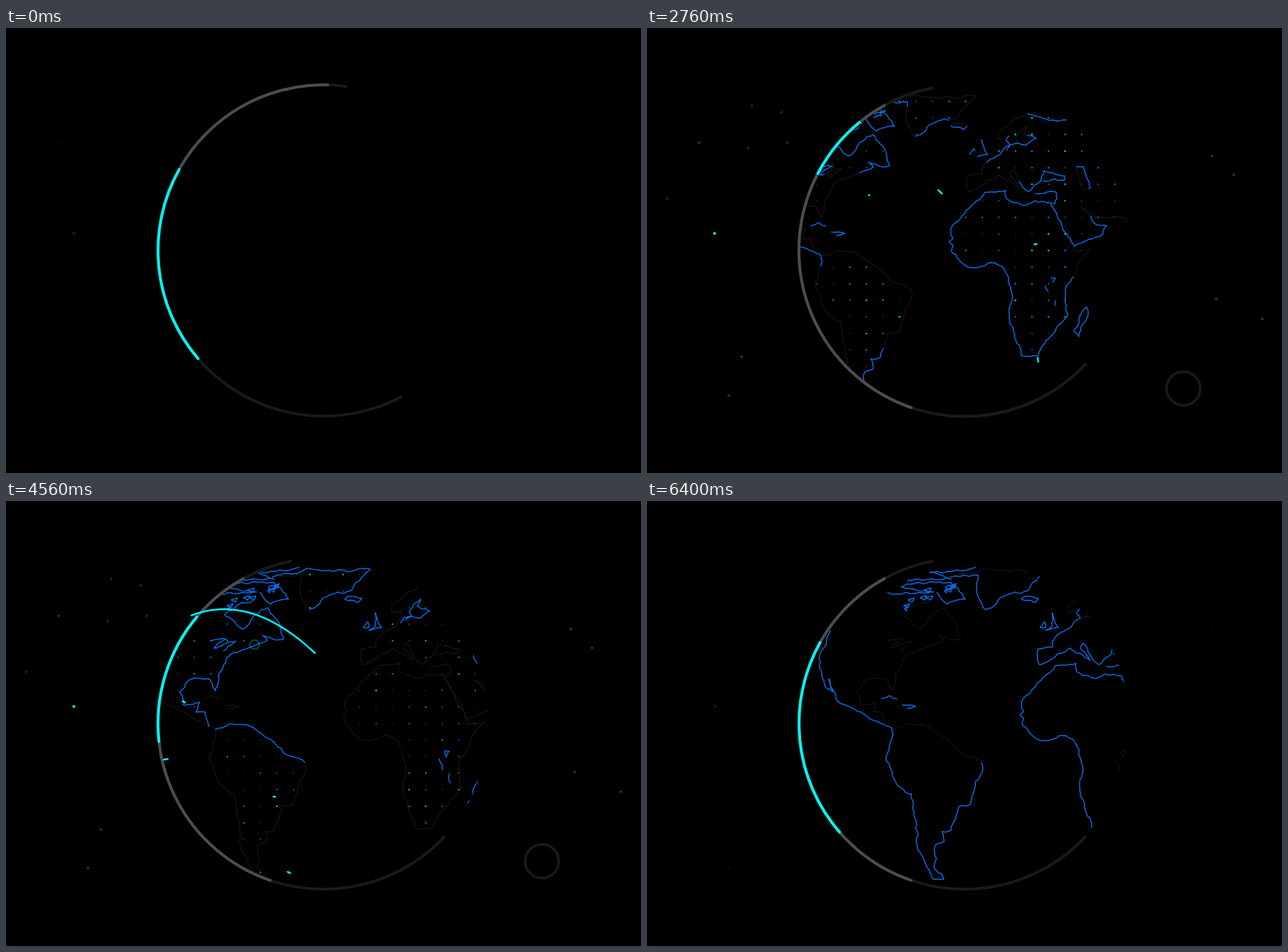
An HTML page with a canvas that plays this animation: 894 by 626 pixels, repeating every 6.44 s.

```html
<!DOCTYPE html>
<html lang="en">
<head>
<meta charset="utf-8">
<title>Globe</title>
<style>
html, body { margin: 0; height: 100%; overflow: hidden; background: #000; }
canvas { display: block; }
</style>
</head>
<body>
<canvas id="stage" width="894" height="626"></canvas>
<script>
const ctx = document.getElementById('stage').getContext('2d');
const LOOP = 6440, CX = 447, CY = 313, R = 233, TAU = Math.PI * 2;
const PIVOT_X = 301.5, PIVOT_Y = 267.7;
const CYAN = '#00f4f2', BLUE = '#0873f8', GREY = '#4d4d51', DARK = '#1a1a1a';
const NAVY = '#1d2f55', DIM = '#222226';
const KEYS = [1200, 2040, 3440, 4560, 5200, 6400];

let seed = 7;
const rand = () => (seed = seed * 16807 % 2147483647) / 2147483647;
const clamp = v => Math.max(0, Math.min(1, v));
const mix = (a, b, u) => a + (b - a) * u;
const rad = a => a * Math.PI / 180;
const parse = s => s.split(' ').map(p => p.split(',').map(Number));

// Each coast: state at every key time (0 dim, 1 lit, x hidden) and its corner points.
const COAST = {
  pacific: ['001001', '177,182 161,220 171,263 181,268 175,250 191,285 229,303 264,321 256,366 274,402 291,412 300,490 321,531 337,532'],
  naEast: ['010110', '254,318 250,297 237,297 242,283 219,287 214,268 226,253 255,250 264,267 269,243 290,213 337,196 330,189 360,194 349,165 337,150 320,160 302,180 277,160 302,143 317,140'],
  saEast: ['001001', '337,532 324,518 324,486 337,479 334,465 347,463 358,430 374,427 381,395 391,381 390,368'],
  saNorth: ['000110', '390,368 364,357 331,329 317,318 285,313 264,321'],
  afWest: ['011001', '493,232 468,256 446,283 449,295 444,300 449,305 447,314 470,336 508,330 520,337 533,378 528,400 545,460'],
  afEast: ['00100x', '545,460 568,461 595,420 611,403 607,367 643,311 620,314 603,277 586,248'],
  afNorth: ['011001', '565,232 594,231 592,247 564,243 552,249 525,241 523,228 493,232'],
  arabia: ['001001', '586,248 620,307 660,290 665,278 645,272 628,252 650,266 692,268 716,321'],
  euWest: ['010011', '471,230 470,208 489,206 493,192 529,165 524,158 528,152'],
  euSouth: ['010011', '471,230 497,215 515,207 543,224 529,206 533,200 555,230 572,216 577,201 606,208 606,214 575,215'],
  norway: ['010010', '527,156 512,157 512,148 534,128 552,121 594,131 625,128'],
  baltic: ['001100', '524,172 530,164 551,165 566,155 548,148 553,138 537,155 540,162 532,168'],
  britain: ['001101', '489,157 498,178 480,182 489,176 489,157'],
  ireland: ['001101', '472,178 479,170 480,178 472,178'],
  iceland: ['010111', '446,138 453,134 470,137 465,143 446,138'],
  glWest: ['001001', '344,107 385,104 383,130 396,153'],
  glEast: ['001101', '396,153 420,135 455,126 467,112 482,96'],
  glNorth: ['000110', '482,96 398,95 344,107'],
  baffin: ['011111', '257,128 322,128 277,121 347,115 367,138 342,145 327,128'],
  arctic: ['001111', '285,112 347,110 317,100 382,93'],
  cuba: ['011011', '249,278 260,274 271,279'],
  haiti: ['011011', '278,287 297,289 285,292'],
  greatLakes: ['001100', '257,196 280,194 262,207 293,197 275,211'],
  victoria: ['001100', '587,351 593,352 589,360 587,351'],
  tanganyika: ['001100', '579,362 584,379'],
  malawi: ['00110x', '593,383 595,397'],
  madagascar: ['01110x', '637,392 639,403 626,434 619,425 637,392'],
  caspian: ['001100', '622,195 633,195 642,225 632,228 622,195']
};

// Midpoint displacement turns a few corners into a natural shoreline.
function roughen([ax, ay], [bx, by], out) {
  const dx = bx - ax, dy = by - ay, d = Math.hypot(dx, dy);
  if (d > 3.5) {
    const k = Math.min(.13, 2.4 / d) * (rand() * 2 - 1);
    const mid = [(ax + bx) / 2 - dy * k, (ay + by) / 2 + dx * k];
    roughen([ax, ay], mid, out);
    roughen(mid, [bx, by], out);
  } else out.push([bx, by]);
}
function shoreline(state, corners) {
  const pts = [corners[0]], path = new Path2D();
  for (let i = 1; i < corners.length; i++) roughen(corners[i - 1], corners[i], pts);
  let len = 0;
  pts.forEach(([x, y], i) => {
    path.lineTo(x, y);
    if (i) len += Math.hypot(x - pts[i - 1][0], y - pts[i - 1][1]);
  });
  return { state, path, len };
}
const shores = Object.values(COAST).map(([state, text]) => shoreline(state, parse(text)));

// Scattered arctic islets.
for (let i = 0; i < 12; i++) {
  const x = mix(280, 350, rand()), y = mix(136, 104, (x - 280) / 70) + rand() * 18, w = 4 + rand() * 7;
  shores.push(shoreline('001101', [[x, y], [x + w, y - 3], [x + w * .7, y + 3], [x, y]]));
}

// Grid of dots over the land.
const land = new Path2D();
function addLand(pts) {
  pts.forEach(([x, y], i) => i ? land.lineTo(x, y) : land.moveTo(x, y));
  land.closePath();
}
for (const names of ['pacific saEast saNorth naEast', 'afWest afEast afNorth', 'glWest glEast glNorth', 'madagascar'])
  addLand(names.split(' ').flatMap(n => parse(COAST[n][1])));
addLand(parse('471,228 489,206 512,157 534,128 640,120 720,150 720,320 640,264 665,280 620,308 594,231 565,232 515,207'));
const dots = [];
for (let i = -13; i <= 12; i++) for (let j = -9; j <= 9; j++) {
  const x = 443.8 + 23.28 * i, y = CY + 23.28 * j;
  if (ctx.isPointInPath(land, x, y))
    dots.push({ x, y, color: rand() < .38 ? '#00d98c' : '#0b72dc', phase: rand() * TAU });
}

const STARS = {
  [NAVY]: parse('74,161.5 795,180 825,206.5 800.5,381 865.5,409 133.5,462 115.5,516.5'),
  [DIM]: parse('28.5,240 143,169 189.5,119 148,109.5 198,161.5'),
  [CYAN]: [[95.5, 289]]
};

// Flights peak at a time and follow a quadratic curve; small sparks are random.
const flight = (peak, text, life = 400) => ({ peak, life, pts: parse(text) });
const flights = [
  flight(2040, '300,319 328,201 373,179'),
  flight(3440, '345,164 355,154 367,148'),
  flight(3440, '428,277 457,261 485,290'),
  flight(4560, '261,161 345,129 435,214')
];
for (let i = 0; i < 36; i++) {
  const a = rand() * TAU, r = R * Math.sqrt(rand()), b = rand() * TAU, n = 1 + rand() * 4;
  const x = CX + r * Math.cos(a), y = CY + r * Math.sin(a), dx = n * Math.cos(b), dy = n * Math.sin(b);
  flights.push({ peak: 1900 + i * 105, life: 220, pts: [[x - dx, y - dy], [x, y], [x + dx, y + dy]] });
}

function stroke(color, width, path) {
  ctx.strokeStyle = color;
  ctx.lineWidth = width;
  path ? ctx.stroke(path) : ctx.stroke();
}
function arc(from, to, color, width = 4, r = R, x = CX, y = CY) {
  ctx.beginPath();
  ctx.arc(x, y, r, rad(from), rad(to));
  stroke(color, width);
}
function disc(x, y, r, color) {
  ctx.fillStyle = color;
  ctx.beginPath();
  ctx.arc(x, y, r, 0, TAU);
  ctx.fill();
}
function hexagon(x, y, r, color, width) {
  ctx.beginPath();
  for (let i = 0; i < 6; i++) ctx.lineTo(x + r * Math.cos(i * TAU / 6), y + r * Math.sin(i * TAU / 6));
  ctx.closePath();
  stroke(color, width);
}
function stars(bright, dim) {
  for (const color in STARS) {
    ctx.globalAlpha = color === DIM ? dim : bright;
    for (const [x, y] of STARS[color]) disc(x, y, 2, color);
  }
  ctx.globalAlpha = 1;
}
function keyAt(t) {
  let i = 0;
  while (i < KEYS.length - 2 && t >= KEYS[i + 1]) i++;
  return [i, clamp((t - KEYS[i]) / (KEYS[i + 1] - KEYS[i]))];
}

function drawCoast(i, u) {
  ctx.lineJoin = 'round';
  ctx.lineCap = 'butt';
  for (const { state, path, len } of shores) {
    const was = state[i] === '1', will = state[i + 1] === '1';
    ctx.globalAlpha = state[i + 1] === 'x' ? 1 - u : 1;
    stroke(DARK, 1, path);
    ctx.globalAlpha = 1;
    const from = was && !will ? u : 0, to = was ? 1 : will ? u : 0;
    if (to - from < .002) continue;
    ctx.setLineDash([0, len * from, len * (to - from), len * 2]);
    stroke(BLUE, 1.3, path);
    ctx.setLineDash([]);
  }
}
function drawDots(t, i, u) {
  const level = [0, .9, 1.25, 1, .85, 0], size = mix(level[i], level[i + 1], u);
  for (const d of dots) disc(d.x, d.y, size * (.85 + .35 * Math.sin(d.phase + t / 400)), d.color);
}
function drawFlights(t) {
  ctx.lineCap = 'round';
  for (const { peak, life, pts: [a, q, b] } of flights) {
    const v = (t - peak) / life;
    if (Math.abs(v) >= 1) continue;
    const from = v > 0 ? v * v : 0, to = v < 0 ? 1 - v * v : 1;
    const at = (s, k) => mix(mix(a[k], q[k], s), mix(q[k], b[k], s), s);
    ctx.beginPath();
    for (let k = 0; k <= 24; k++) {
      const s = mix(from, to, k / 24);
      ctx.lineTo(at(s, 0), at(s, 1));
    }
    stroke(CYAN, 2.5);
  }
}
function drawPulses(t) {
  const p = (t - 1640) / 800, q = (t - 4400) / 480;
  if (p > 0 && p < 1) {
    ctx.globalAlpha = Math.min(1, 2 - 2 * p);
    hexagon(273.3, 382, 24.2 * Math.sqrt(2 * p), '#a9e35f', 2);
    ctx.lineCap = 'butt';
    arc(0, 360, '#202020', 1.8, 18.6, 499, 312);
    arc(70 + 360 * (p - .5), 98 + 360 * (p - .5), '#00d4b4', 3.6, 18.6, 499, 312);
  }
  if (q > 0 && q < 1) {
    ctx.globalAlpha = .9 * (1 - q);
    hexagon(350, 202, 21 * q, '#00b49a', 1.3);
  }
  ctx.globalAlpha = 1;
}

function intro(s) {
  stars(.16 * clamp(1 - s / .12), 0);
  const u = clamp(s / .7), turn = u * (.6 + .4 * u);
  ctx.lineCap = 'round';
  ctx.globalAlpha = 1 - u * u;
  arc(62 + 190 * turn, 277.7 + 190 * turn, DARK);
  arc(139 + 270 * turn, 271.2 + 270 * turn, GREY);
  ctx.globalAlpha = clamp((1 - s) / .3);
  arc(139.3 - 10.4 * s, 209.3 - 3.5 * s, CYAN);
  ctx.globalAlpha = 1;
}

function globe(t) {
  const zoom = 1 + 6.2 * Math.exp((1200 - t) / 190), s = (t - 3440) / 1000;
  const [i, u] = keyAt(t), fade = clamp((6400 - t) / 440);
  ctx.translate(PIVOT_X, PIVOT_Y);
  ctx.scale(zoom, zoom);
  ctx.translate(-PIVOT_X, -PIVOT_Y);

  stars(mix(.16, 1, fade), fade);
  ctx.globalAlpha = fade;
  arc(0, 360, DARK, 3.6, 23.7, 754.5, 506.7);
  ctx.globalAlpha = 1;

  ctx.save();
  ctx.beginPath();
  ctx.arc(CX, CY, R - .5, 0, TAU);
  ctx.clip();
  ctx.translate(27.4 * s, 0);
  drawCoast(i, u);
  drawDots(t, i, u);
  ctx.restore();

  ctx.lineCap = 'round';
  arc(43.3, 258.6, DARK);
  arc(108.8, 241, GREY);
  arc(194.9 - 18.87 * s, 226.6 - 5.85 * s, CYAN);
  drawPulses(t);
  drawFlights(t);
}

function frame() {
  const t = performance.now() % LOOP;
  ctx.setTransform(1, 0, 0, 1, 0, 0);
  ctx.globalAlpha = 1;
  ctx.fillStyle = '#000';
  ctx.fillRect(0, 0, 894, 626);
  if (t < 1000) intro(t / 1000);
  else if (t >= 1200) globe(t);
  requestAnimationFrame(frame);
}
frame();
</script>
</body>
</html>
```
